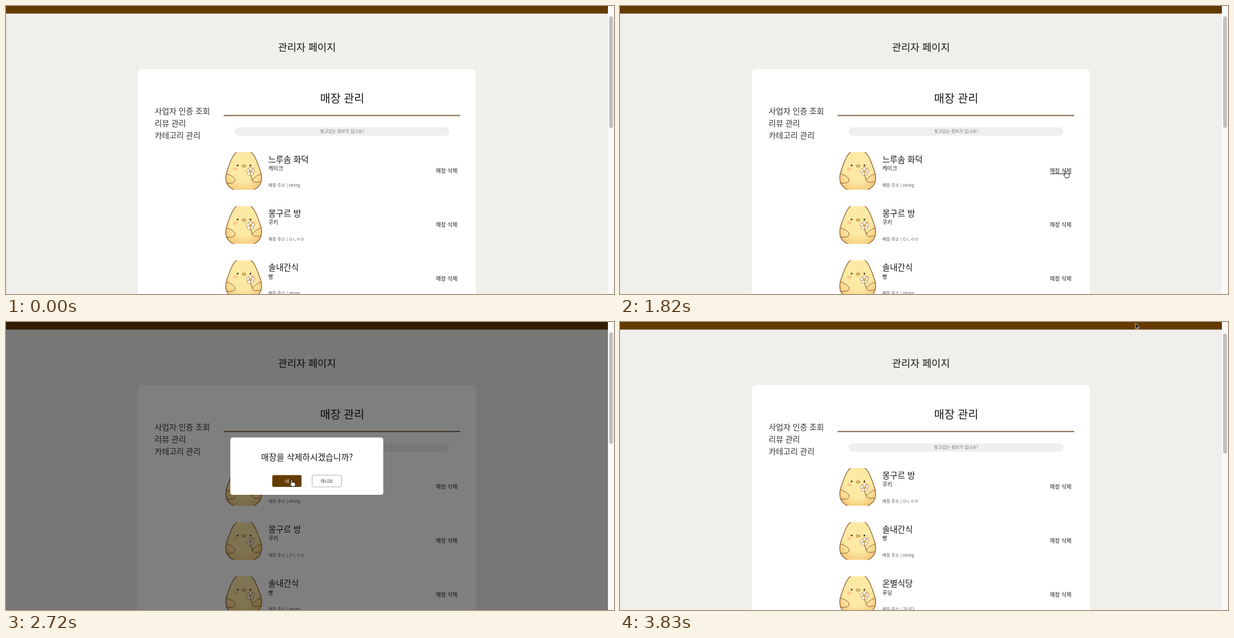
Animation of 1000 by 475 pixels, one loop 3.92 s. Source, as an HTML page:

```html
<!DOCTYPE html>
<html lang="ko">
<head>
<meta charset="utf-8">
<title>관리자 페이지</title>
<style>
html, body { margin: 0; width: 100%; height: 100%; overflow: hidden; background: #f0efeb; }
svg { display: block; width: 1000px; height: 475px; }
text { font-family: "Noto Sans CJK KR", "Noto Sans CJK JP", "Noto Sans CJK", sans-serif; fill: #151515; }
.mid { text-anchor: middle; }
.menu { font-size: 13px; fill: #333; }
.name { font-size: 13.6px; font-weight: 500; }
.kind { font-size: 8.8px; fill: #222; }
.addr { font-size: 7px; fill: #555; }
.del { font-size: 9px; font-weight: 500; fill: #222; }
.btn { font-size: 7.2px; }

#list, #first, #underline, #modal, #thumb, #cursor, #arrow, #hand {
  animation: 3920ms step-end infinite;
}
#list { animation-name: list; }
#first { animation-name: first; }
#underline { animation-name: underline; }
#modal { animation-name: modal; }
#thumb { animation-name: thumb; }
#cursor { animation-name: move, appear; }
#arrow { animation-name: arrow; }
#hand { animation-name: hand; }

@keyframes list {
  0% { transform: none; }
  71.939%, 100% { transform: translateY(-89.2px); }
}
@keyframes first {
  0% { visibility: visible; }
  71.939%, 100% { visibility: hidden; }
}
@keyframes underline {
  0%, 46.939%, 100% { opacity: 0; }
  44.643% { opacity: 1; }
}
@keyframes modal {
  0%, 71.939%, 100% { visibility: hidden; }
  46.939% { visibility: visible; }
}
@keyframes thumb {
  0% { y: 17px; height: 184px; }
  71.939%, 100% { y: 19px; height: 198px; }
}
@keyframes appear {
  0% { visibility: hidden; }
  36.99%, 100% { visibility: visible; }
}
@keyframes move {
  0% { transform: translate(768px, 274px); }
  40.816% { transform: translate(768px, 274px); animation-timing-function: steps(7, start); }
  46.173% { transform: translate(733px, 272px); }
  51.276% { transform: translate(733px, 272px); animation-timing-function: steps(11, start); }
  65.587% { transform: translate(470px, 260px); }
  85.969% { transform: translate(470px, 260px); animation-timing-function: steps(6, start); }
  100% { transform: translate(848px, 2px); }
}
/* the pointer turns into a hand over links and buttons */
@keyframes hand {
  0%, 51.276%, 62.985%, 71.939%, 100% { opacity: 0; }
  44.643%, 60.383%, 64.286% { opacity: 1; }
}
@keyframes arrow {
  0%, 51.276%, 62.985%, 71.939%, 100% { opacity: 1; }
  44.643%, 60.383%, 64.286% { opacity: 0; }
}
</style>
</head>
<body>
<svg viewBox="0 0 1000 475">
  <defs>
    <radialGradient id="down" cx=".5" cy=".38" r=".64">
      <stop offset=".6" stop-color="#fce9a3"/>
      <stop offset="1" stop-color="#f5cb7c"/>
    </radialGradient>
    <clipPath id="frame"><rect width="62" height="62"/></clipPath>
    <g id="chick" clip-path="url(#frame)" fill="none" stroke="#93673f" stroke-linecap="round">
      <path d="M31-4C48-4 52 14 57 27C63 42 62 56 46 63Q31 66 16 63C0 56-1 42 5 27C10 14 14-4 31-4Z" fill="url(#down)" stroke-width="1.3"/>
      <g fill="#f6bf8c" stroke="none" opacity=".75">
        <ellipse cx="17" cy="27.5" rx="3.6" ry="2.6"/>
        <ellipse cx="46" cy="27.5" rx="3.6" ry="2.6"/>
      </g>
      <g fill="#3f2a1b" stroke="none">
        <circle cx="21" cy="22" r="1.4"/>
        <circle cx="42" cy="22" r="1.4"/>
      </g>
      <ellipse cx="31.5" cy="22.8" rx="3" ry="2" fill="#f9d071" stroke-width=".9"/>
      <path d="M3 36Q16 40 17 46Q16 53 2 51" stroke-width="1"/>
      <path d="M60 36Q50 39 45 46Q46 52 58 49" stroke-width="1"/>
      <path d="M42 37L45.5 47" stroke-width="1.2"/>
      <g id="petals" fill="#fffaf0" stroke="#a87a48" stroke-width=".7"></g>
      <circle cx="42" cy="32" r="2" fill="#f7c95a" stroke-width=".5"/>
    </g>
  </defs>

  <rect width="1000" height="475" fill="#f0efeb"/>
  <rect width="990" height="12.5" fill="#653a02"/>
  <text class="mid" x="495" y="74" font-size="16.4" font-weight="500">관리자 페이지</text>
  <rect x="217" y="104" width="555.5" height="390" rx="6" fill="#fff"/>
  <text class="mid" x="553" y="159.3" font-size="18.4">매장 관리</text>
  <g class="menu">
    <text class="menu" x="244.5" y="177.5">사업자 인증 조회</text>
    <text class="menu" x="244.5" y="198">리뷰 관리</text>
    <text class="menu" x="244.5" y="218.3">카테고리 관리</text>
  </g>
  <rect x="358" y="179.7" width="389" height="1.8" fill="#7b5a38"/>
  <rect x="376" y="200" width="353.5" height="14" rx="7" fill="#efefef"/>
  <text class="mid" x="553" y="209.3" font-size="7.1" style="fill:#757575">찾고있는 정보가 있나요?</text>

  <g id="list"></g>
  <path id="underline" d="M707.5 276.7H742" stroke="#222" stroke-width="1"/>

  <g id="modal">
    <rect width="990" height="475" fill="#000" opacity=".5"/>
    <rect x="369" y="190.5" width="251.5" height="94.5" rx="4" fill="#fff"/>
    <text class="mid" x="495" y="228" font-size="13.9">매장을 삭제하시겠습니까?</text>
    <rect x="438" y="252.5" width="48" height="19.5" rx="2.5" fill="#653c02"/>
    <text class="mid btn" x="462" y="264.6" style="fill:#fff">네</text>
    <rect x="503.5" y="252.5" width="48" height="19.5" rx="2.5" fill="#fff" stroke="#aaa" stroke-width=".9"/>
    <text class="mid btn" x="527.7" y="264.6">아니오</text>
  </g>

  <rect x="990" width="10" height="475" fill="#fafafa"/>
  <rect id="thumb" x="992" y="17" width="6.5" height="184" rx="3.2" fill="#c1c1c1"/>

  <g id="cursor" stroke-linejoin="round">
    <path id="arrow" d="M0 0V9.2L2 7.3L3.4 10.4L5 9.7L3.6 6.7H6.3Z" fill="#111" stroke="#fff" stroke-width=".7"/>
    <path id="hand" d="M-1.2 6V.9A1 1 0 0 1 .8 .9V4.4Q2.4 3.7 2.7 4.7Q4.2 4.2 4.5 5.2Q5.9 5 5.9 6.2V8.4Q5.9 9.8 5.1 10.6V11.4H-.2Q-.8 9.8-2.8 7.6Q-3.4 6.5-2.6 6.1Q-1.9 5.9-1.2 7Z" fill="#fff" stroke="#111" stroke-width=".9"/>
  </g>
</svg>
<script>
const shops = [
  ["느루솜 화덕", "케이크", "string"],
  ["몽구르 방", "쿠키", "ㅁㄴㅇㄹ"],
  ["솔내간식", "빵", "string"],
  ["온별식당", "푸딩", "가나다"]
];

const row = ([name, kind, address], i) => `
  <g ${i ? "" : 'id="first"'}><g transform="translate(0 ${i * 89.2})">
    <use href="#chick" x="360" y="241"/>
    <text class="name" x="431.5" y="258">${name}</text>
    <text class="kind" x="431.5" y="271.3">${kind}</text>
    <text class="addr" x="431.5" y="297.6">매장 주소 | ${address}</text>
    <text class="del" x="707" y="275">매장 삭제</text>
  </g></g>`;

const petal = (_, i) => {
  const a = (i / 5) * 2 * Math.PI - Math.PI / 2;
  return `<circle cx="${42 + 4.2 * Math.cos(a)}" cy="${32 + 4.2 * Math.sin(a)}" r="2.8"/>`;
};

document.getElementById("petals").innerHTML = Array.from({ length: 5 }, petal).join("");
document.getElementById("list").innerHTML = shops.map(row).join("");
</script>
</body>
</html>
```
